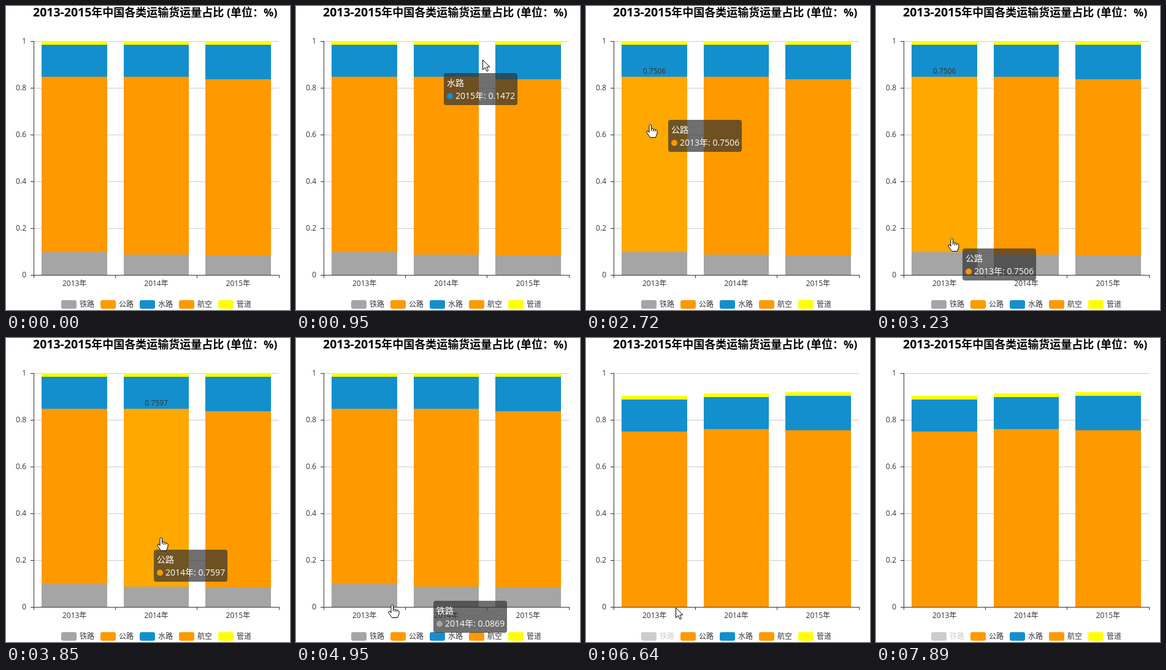
Write an HTML page that moves like this. It is 463x494 px and loops after 8 s.

```html
<!DOCTYPE html>
<html lang="zh">
<head>
<meta charset="utf-8">
<style>
html, body { margin: 0; width: 100%; height: 100%; overflow: hidden; background: #fff; }
svg { display: block; font: 12px "Open Sans", "Noto Sans CJK SC", "Noto Sans CJK", sans-serif; fill: #333; }
.title { font-size: 18px; font-weight: 700; fill: #000; }
.title .latin { font-size: 19.5px; }
.tip text { font-size: 14px; fill: #fff; }
.cursor path { fill: #fff; stroke: #000; stroke-width: 1; stroke-linejoin: round; }
.cursor .knuckles { fill: none; }
</style>
</head>
<body>
<svg id="stage" width="463" height="494" viewBox="0 0 463 494"></svg>
<script>
const LOOP = 8000, LAG = 79, CLICK = 5880, GONE = 7885;
const BASE = 437, HEIGHT = 380, LEFT = 45, WIDTH = 400;

const years = ['2013年', '2014年', '2015年'];
const series = [
  { name: '铁路', color: '#a5a5a5', hover: '#b5b5b5', data: [0.0967, 0.0869, 0.0804] },
  { name: '公路', color: '#ff9900', hover: '#ffa800', data: [0.7506, 0.7597, 0.7553] },
  { name: '水路', color: '#148fcd', hover: '#169ee2', data: [0.1364, 0.1364, 0.1472] },
  { name: '航空', color: '#ff9900', hover: '#ffa800', data: [0, 0, 0] },
  { name: '管道', color: '#ffff00', hover: '#ffff30', data: [0.0163, 0.0170, 0.0171] }
];

const bursts = [
  [550, 1310, 11], [1390, 2160, 11], [2230, 3020, 11], [3100, 3850, 11], [3910, 4710, 11],
  [4790, 5490, 10], [5880, 6110, 4], [6490, 7120, 9], [7570, 7890, 5]
];

// Pointer path: time, x, y.
const path = [
  [550, 444, 428], [700, 438, 250], [790, 395, 92], [880, 375, 88], [960, 262, 86],
  [1050, 235, 84], [1130, 125, 88], [1210, 115, 80], [1310, 80, 14],
  [1390, 76, 12], [1760, 150, 15], [2160, 231, 8],
  [2230, 285, 92], [2309, 168, 97], [2460, 135, 110], [2700, 105, 190], [2941, 113, 322],
  [3020, 118, 350], [3096, 121, 374], [3175, 124, 377], [3330, 124, 377], [3550, 150, 352],
  [3771, 221, 324], [3850, 253, 324], [3990, 275, 335], [4150, 292, 350], [4230, 362, 356],
  [4500, 385, 345], [4710, 378, 352], [4788, 292, 385], [4866, 204, 407], [4945, 157, 433],
  [5100, 135, 462], [5400, 121, 480], [6490, 121, 480], [6568, 136, 462], [6647, 146, 438],
  [6800, 140, 415], [7030, 148, 400], [7570, 148, 400], [7650, 156, 412], [7890, 180, 490]
];

const line = (x1, y1, x2, y2, color) =>
  `<path d="M${x1} ${y1}L${x2} ${y2}" stroke="${color}" shape-rendering="crispEdges"/>`;
const rect = (x, y, w, h, fill, rx = 0) =>
  `<rect x="${x}" y="${y}" width="${w}" height="${h}" fill="${fill}" rx="${rx}"/>`;
const label = (x, y, text, anchor = 'start', fill = '#333') =>
  `<text x="${x}" y="${y}" text-anchor="${anchor}" fill="${fill}">${text}</text>`;

function gridMarkup() {
  let out = '<text class="title" x="44" y="17"><tspan class="latin">2013-2015</tspan>年中国各类运输货运量占比 (单位：%)</text>';
  for (let i = 1; i <= 5; i++) {
    const y = BASE - i * 76 + 0.5;
    out += line(LEFT, y, LEFT + WIDTH, y, '#ccc');
  }
  return out;
}

function axisMarkup() {
  let out = line(LEFT + 0.5, 57, LEFT + 0.5, BASE + 1, '#333') +
    line(LEFT, BASE + 0.5, LEFT + WIDTH + 1, BASE + 0.5, '#333');
  for (let i = 0; i <= 5; i++) {
    const y = BASE - i * 76;
    out += line(LEFT - 5, y + 0.5, LEFT, y + 0.5, '#333') + label(33, y + 4, i / 5, 'end');
  }
  for (let i = 0; i <= 3; i++) {
    const x = Math.floor(LEFT + i * WIDTH / 3) + 0.5;
    out += line(x, BASE, x, BASE + 5, '#333');
  }
  years.forEach((year, i) => { out += label(LEFT + (i + 0.5) * WIDTH / 3, 455, year, 'middle'); });
  return out;
}

function legendMarkup(off) {
  return series.map((s, i) => {
    const x = 90 + i * 64, grey = off && i === 0;
    return rect(x, 478, 25, 14, grey ? '#ccc' : s.color, 3) +
      label(x + 30, 489, s.name, 'start', grey ? '#ccc' : '#333');
  }).join('');
}

// Time of the latest screen update.
function sampled(t) {
  let now = 0;
  for (const [start, end, steps] of bursts) {
    if (t < start) break;
    const step = (end - start) / (steps - 1);
    now = start + step * Math.min(steps - 1, Math.floor((t - start + 12) / step));
  }
  return now;
}

function pointer(t) {
  if (t < path[0][0] || t >= GONE) return null;
  const i = path.findIndex(p => p[0] > t);
  const [t0, x0, y0] = path[i - 1], [t1, x1, y1] = path[i];
  const k = (t - t0) / (t1 - t0);
  return { x: x0 + (x1 - x0) * k, y: y0 + (y1 - y0) * k };
}

function stack(rail) {
  const bars = [];
  years.forEach((year, col) => {
    const x = Math.round(LEFT + (col + 0.1) * WIDTH / 3);
    const right = Math.round(LEFT + (col + 0.9) * WIDTH / 3);
    let bottom = BASE;
    series.forEach((s, row) => {
      const value = s.data[col];
      const top = bottom - value * HEIGHT * (row ? 1 : rail);
      bars.push({ s, year, value, x, w: right - x, top, bottom });
      bottom = top;
    });
  });
  return bars;
}

const hit = (bars, p) => p && bars.find(b =>
  p.x >= b.x && p.x < b.x + b.w && p.y >= b.top && p.y < b.bottom);

function barMarkup(b, active) {
  const y = Math.round(b.top), h = Math.round(b.bottom) - y;
  return h > 0 ? rect(b.x, y, b.w, h, b === active ? b.s.hover : b.s.color) : '';
}

function tipMarkup(b, p) {
  const x = Math.round(p.x + 140 > 463 ? p.x - 140 : p.x + 20), y = Math.round(p.y + 20);
  return `<g class="tip" transform="translate(${x} ${y})">` +
    rect(0, 0, 120, 52, 'rgba(50,50,50,.7)', 4) +
    `<circle cx="10" cy="37.5" r="5" fill="${b.s.color}"/>` +
    label(5, 21, b.s.name, 'start', '#fff') +
    label(19, 42, `${b.year}: ${b.value.toFixed(4)}`, 'start', '#fff') + '</g>';
}

const ARROW = '<path d="M.5 .5V16.5L4.3 13 7 19 9.5 18 7 12H12Z"/>';
const HAND = '<path d="M-2 2Q-.5-1 1.5 1.5V7.5Q3.5 6 4.5 8.5 6.5 7 7.5 9.5 10 8.5 11 11V15L8.5 21.5H-.5' +
  'L-6 13.5Q-6.5 10.5-4 11L-2 13.5Z"/><path class="knuckles" d="M1.5 7.5V11M4.5 8.5V12M7.5 9.5V12"/>';

function cursorMarkup(p, hand) {
  return `<g class="cursor" transform="translate(${Math.round(p.x)} ${Math.round(p.y)})">${hand ? HAND : ARROW}</g>`;
}

const stage = document.getElementById('stage');
const grid = gridMarkup(), axis = axisMarkup();
let shown = -1;

function draw(t) {
  const now = sampled(t);
  if (now === shown) return;
  shown = now;

  const k = Math.min(1, Math.max(0, (now - CLICK + 77) / 307));
  const bars = stack(now < CLICK ? 1 : (1 - k) ** 3);
  const p = pointer(now), late = p && pointer(now - LAG);
  const over = hit(bars, p), tipBar = hit(bars, late);
  const active = over === tipBar ? over : null;
  const onLegend = p && p.y > 476 && p.x >= 90 && p.x < 402;

  let out = grid + bars.map(b => barMarkup(b, active)).join('') + axis + legendMarkup(now >= CLICK);
  if (active) out += label(active.x + active.w / 2, Math.round(active.top) - 5, active.value.toFixed(4), 'middle');
  if (tipBar) out += tipMarkup(tipBar, late);
  if (p) out += cursorMarkup(p, over || onLegend);
  stage.innerHTML = out;
}

const begin = performance.now();
function tick() {
  draw((performance.now() - begin) % LOOP);
  requestAnimationFrame(tick);
}
tick();
</script>
</body>
</html>
```
